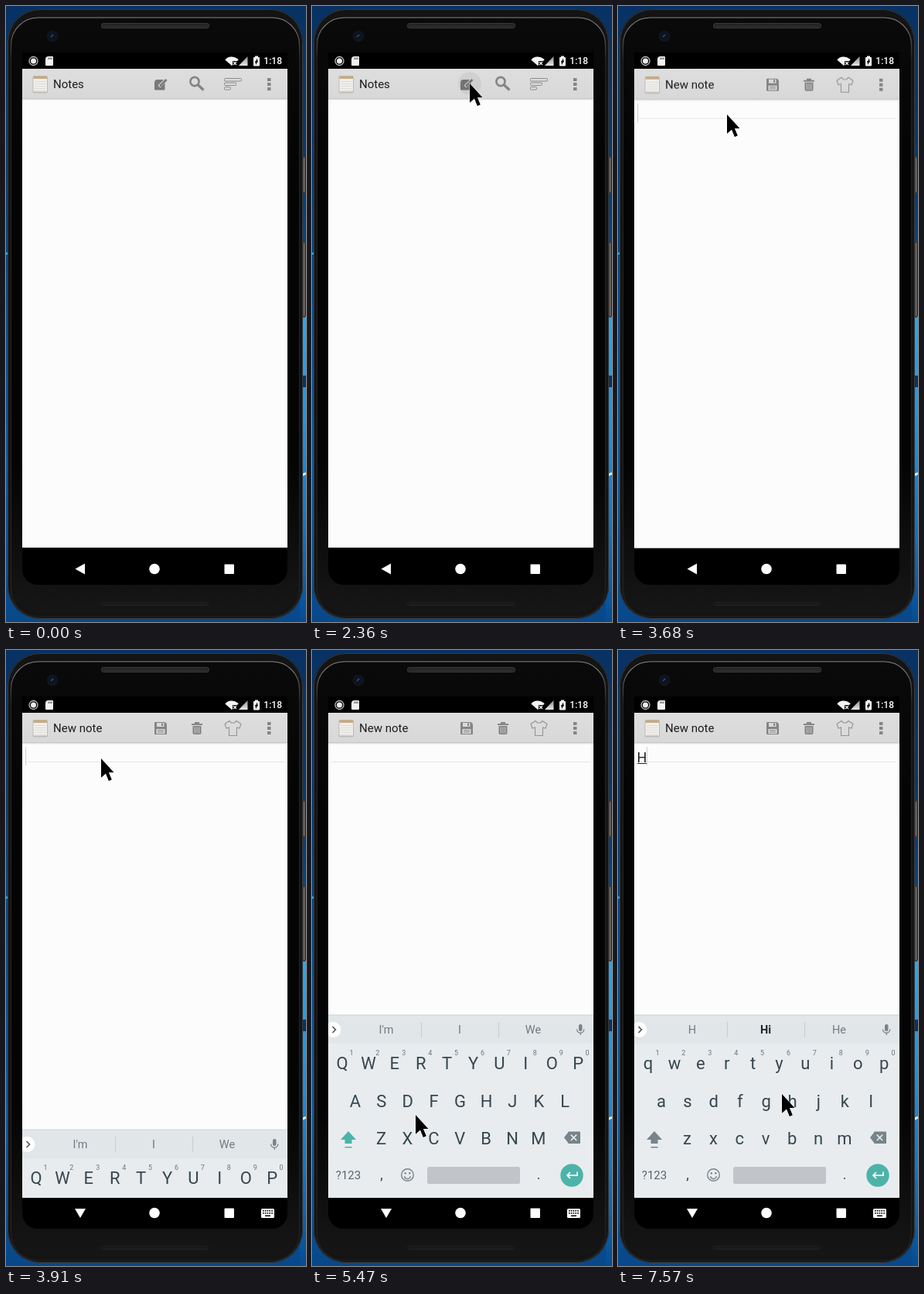
An HTML page with a canvas that plays this animation: 388 px wide and 795 px high, repeating every 8000 ms.

```html
<!DOCTYPE html>
<html lang="en">
<head>
<meta charset="utf-8">
<title>Notes on a phone</title>
<style>
html, body { margin: 0; width: 100%; height: 100%; overflow: hidden; background: #000; }
canvas { display: block; width: 388px; height: 795px; }
</style>
</head>
<body>
<canvas id="stage" width="388" height="795"></canvas>
<script>
const W = 388, H = 795, LOOP = 8000;
const stage = document.getElementById('stage').getContext('2d');
const layerCanvas = document.createElement('canvas');
layerCanvas.width = W;
layerCanvas.height = H;
const layer = layerCanvas.getContext('2d');
let g = stage;

// ---------- helpers ----------
function rect(x, y, w, h, color) {
  g.fillStyle = color;
  g.fillRect(x, y, w, h);
}
function fill(color) {
  g.fillStyle = color;
  g.fill();
}
function stroke(color, width = 1) {
  g.strokeStyle = color;
  g.lineWidth = width;
  g.stroke();
}
function box(x, y, w, h, r) {
  g.beginPath();
  g.roundRect(x, y, w, h, r);
}
function arc(x, y, r, from = 0, to = Math.PI * 2) {
  g.beginPath();
  g.arc(x, y, r, from, to);
}
function trace(points, closed = true) {
  g.beginPath();
  points.forEach(([x, y]) => g.lineTo(x, y));
  if (closed) g.closePath();
}
function roundRect(x, y, w, h, r, color) {
  box(x, y, w, h, r);
  fill(color);
}
function strokeRound(x, y, w, h, r, color, width) {
  box(x, y, w, h, r);
  stroke(color, width);
}
function disc(x, y, r, color) {
  arc(x, y, r);
  fill(color);
}
function ring(x, y, r, color, width) {
  arc(x, y, r);
  stroke(color, width);
}
function segment(x0, y0, x1, y1, color, width) {
  trace([[x0, y0], [x1, y1]], false);
  stroke(color, width);
}
// Isosceles triangle: tip at x,y, pointing along angle.
function triangle(x, y, length, half, angle, color) {
  g.save();
  g.translate(x, y);
  g.rotate(angle);
  trace([[0, 0], [-length, half], [-length, -half]]);
  fill(color);
  g.restore();
}
function chevron(x, y, size, color, width) {
  trace([[x - size, y - Math.abs(size)], [x, y], [x - size, y + Math.abs(size)]], false);
  stroke(color, width);
}
function cross(x, y, r, color, width) {
  segment(x - r, y - r, x + r, y + r, color, width);
  segment(x + r, y - r, x - r, y + r, color, width);
}
function repeat(count, draw) {
  for (let i = 0; i < count; i++) draw(i);
}
function text(str, x, y, size, color, align = 'left', weight = 400) {
  g.font = `${weight} ${size}px Roboto, sans-serif`;
  g.textAlign = align;
  g.fillStyle = color;
  g.fillText(str, x, y);
}
function gradient(y0, y1, ...colors) {
  const grad = g.createLinearGradient(0, y0, 0, y1);
  colors.forEach((color, i) => grad.addColorStop(i / (colors.length - 1), color));
  return grad;
}

// ---------- phone ----------
function wallpaper() {
  rect(0, 0, W, H, gradient(0, H, '#083263', '#083a70', '#0a4d8e', '#0a5ca6', '#08488a'));
  rect(0, 318, 4, 3, '#2fa0dc');
  rect(380, 400, 8, H - 400, gradient(400, H, '#2ba6ee', '#1c95ea', '#0d7ad0', '#084c90'));
  rect(380, 477, 8, 15, '#06335f');
  segment(382, 606, 388, 603, '#d8effc', 3);
}

function speaker(x, y, w, h, color, mesh) {
  strokeRound(x, y, w, h, h / 2, color, 1);
  for (let i = 3; i < w - 2; i += 2) rect(x + i, y + h / 2, 1, 1, mesh);
}

function body() {
  for (const [y, h] of [[194, 48], [304, 98]]) {
    roundRect(381, y, 6.5, h, 1.5, '#3c3a38');
    rect(385, y + 2, 1, h - 4, '#8a8580');
  }
  roundRect(2, 4, 382, 787, 42, '#141414');
  strokeRound(2.5, 4.5, 381, 786, 42, '#3b3b3b', 1);
  roundRect(6, 14, 374, 768, 35, gradient(14, 782, '#0a0a0a', '#040404', '#040404', '#040404', '#161616'));
  strokeRound(6.5, 15, 373, 773, 35, gradient(14, 70, '#8a8a8a', '#222'), 1.2);
  roundRect(123, 22, 140, 7, 3.5, '#232323');
  speaker(123.5, 22.5, 139, 6, '#3a3a3a', '#4a4a4a');
  speaker(123.5, 769.5, 138, 4, '#222', '#333');
  disc(60, 39, 7.5, '#11141a');
  disc(60, 39, 4, '#0a1524');
  segment(58, 40, 61, 37, '#35536f', 1.5);
  roundRect(21, 60, 343, 687, [0, 0, 20, 20], '#000');
}

function statusBar() {
  ring(35.5, 71, 5.5, '#c4c4c4', 1.3);
  disc(35.5, 71, 3.5, '#ededed');
  roundRect(51, 65, 10, 12, [4, 1, 1, 1], '#f2f2f2');
  repeat(3, i => rect(54.5 + i * 2, 66.5, 1, 2.5, '#444'));
  g.beginPath();
  g.moveTo(292, 77);
  g.arc(292, 77, 11.5, -2.42, -0.72);
  fill('#f4f4f4');
  rect(293, 71, 7, 7, '#000');
  cross(296, 74, 2, '#f4f4f4', 1.3);
  trace([[301, 77], [312.5, 77], [312.5, 65]]);
  fill(gradient(65, 77, '#8d8d8d', '#e8e8e8'));
  roundRect(320, 66, 8, 11.5, 1, '#f4f4f4');
  rect(322, 64.5, 4, 2, '#f4f4f4');
  triangle(323.5, 76, 5, 1.5, Math.PI / 2, '#000');
  triangle(324.5, 67.5, 5, 1.5, -Math.PI / 2, '#000');
  text('1:18', 357, 75.3, 12, '#fff', 'right', 500);
}

function navBar(keyboardUp) {
  if (keyboardUp) triangle(96, 733, 12, 7, Math.PI / 2, '#fff');
  else triangle(89.5, 726.5, 12.5, 7, Math.PI, '#fff');
  disc(192, 726.5, 6.8, '#fff');
  roundRect(282.5, 720.5, 12.5, 12.5, 1, '#fff');
  if (!keyboardUp) return;
  roundRect(330, 721, 17, 12, 1.5, '#fff');
  repeat(10, i => rect(332 + i % 5 * 2.8, i < 5 ? 723 : 726, 1.6, 1.6, '#000'));
  rect(335, 729.5, 7, 1.5, '#000');
}

// ---------- app screens ----------
const ICON = '#858585', BAR = '#dadada';

function appWindow(title) {
  rect(21, 81, 343, 618, '#fcfcfc');
  rect(21, 81, 343, 39, gradient(81, 120, '#dedede', '#d8d8d8'));
  rect(21, 119.5, 343, 1, '#b9b9b9');
  rect(21, 120.5, 343, 1, '#ececec');

  roundRect(34.5, 90, 19.5, 22.5, 2.5, '#bdbbb8');
  roundRect(35.5, 92, 17.5, 18.5, 1, '#f1efec');
  rect(35.5, 90.5, 17.5, 3.5, '#c5ab86');
  repeat(5, i => rect(37, 97 + i * 3, 14.5, 1, '#dedbd7'));
  text(title, 61, 106, 15, '#1c1c1c');
  repeat(3, i => rect(338, 93 + i * 6, 4.5, 4, ICON));
}

function pencilIcon() {
  roundRect(192, 95, 13.5, 13.5, [4, 0, 1, 1], '#797979');
  segment(198, 104, 208, 94, BAR, 4);
  segment(199, 103.5, 207.5, 95, '#797979', 2.6);
}

function listScreen(t) {
  appWindow('Notes');
  pencilIcon();
  ring(244, 97.5, 5.6, ICON, 2.6);
  segment(248, 101.5, 255.5, 108.5, ICON, 3.4);
  repeat(3, i => strokeRound(282.5, 93.5 + i * 5.5, 22 - i * 7, 3.5, 1, '#8b8b8b', 1));
  if (t >= 2360 && t < 2440) disc(204, 100, 15, 'rgba(0,0,0,.05)');
  if (t < 3050) return;
  text('<Untitled>', 25, 154, 18, '#111');
  text('2019.05.19 13:18:36', 25, 186, 11.8, '#444');
}

function saveIcon() {
  roundRect(192, 93, 16, 16, [1, 4, 1, 1], ICON);
  rect(195, 94, 9.5, 5, BAR);
  rect(201, 94.5, 2, 3.5, ICON);
  rect(194.5, 102, 11, 6, BAR);
  repeat(2, i => rect(196, 103.3 + i * 2.2, 8, 1, ICON));
}

function trashIcon() {
  rect(240, 95, 14, 2, ICON);
  rect(244, 93, 6, 2, ICON);
  roundRect(241.5, 98, 11, 11, [0, 0, 2, 2], ICON);
  repeat(3, i => rect(243.8 + i * 2.7, 99.5, 1, 8, '#d0d0d0'));
}

function shirtIcon() {
  const half = [[2, 94], [4.5, 91.5], [10.5, 95.5], [8.5, 101], [5, 100], [5, 110.5]];
  const right = half.map(([x, y]) => [293.5 + x, y]);
  const left = half.map(([x, y]) => [293.5 - x, y]).reverse();
  trace([...right, ...left]);
  stroke('#949494', 1.1);
}

// The caret blinks on a steady beat and lights up again after typing.
function caretOn(t) {
  return t >= TYPED || Math.abs(Math.floor((t - 4060) / 507)) % 2 === 1;
}

function noteScreen(t) {
  appWindow('New note');
  saveIcon();
  trashIcon();
  shirtIcon();
  rect(25, 144, 335, 1, t >= KEYS ? '#e3e3fa' : '#e8e8e8');
  const typed = t >= TYPED;
  if (typed) {
    text('H', 24.5, 144.5, 18, '#222');
    rect(25, 146, 12.5, 1, '#222');
  }
  if (caretOn(t)) rect(typed ? 37 : 25, 125, 1, 24, '#d0d0d0');
}

// ---------- keyboard ----------
const KEY = '#37464e', SOFT = '#78838a', TEAL = '#4db3a9', PITCH = 33.9;

function keyRow(letters, x, y, size = 22, color = KEY) {
  [...letters].forEach((c, i) => text(c, x + i * PITCH, y, size, color, 'center'));
}

function suggestions(words, best) {
  rect(21, 471, 343, 37, '#e1e6e9');
  rect(21, 470.5, 343, 1, '#d0d4d7');
  disc(27.5, 490, 10, '#fff');
  chevron(30.5, 490, 4, '#4b5358', 1.6);
  words.forEach((word, i) => {
    const bold = word === best;
    text(word, 96 + i * 95, 495, 14.5, bold ? '#1e272c' : '#727b80', 'center', bold ? 700 : 400);
  });
  repeat(2, i => rect(141 + i * 100, 480, 1, 20, '#c8cdd0'));
  roundRect(345, 483, 4.5, 9, 2.2, SOFT);
  arc(347.2, 489.5, 4.6, 0, Math.PI);
  stroke(SOFT, 1.3);
  rect(346.6, 494, 1.3, 3, SOFT);
}

function keyboard(lower) {
  const cased = s => lower ? s.toLowerCase() : s;
  rect(21, 471, 343, 236, '#e8ecef');
  suggestions(lower ? ['H', 'Hi', 'He'] : ["I'm", 'I', 'We'], 'Hi');
  keyRow(cased('QWERTYUIOP'), 39, 541);
  keyRow('1234567890', 51, 523, 9, '#6b757b');
  keyRow(cased('ASDFGHJKL'), 56, 589.5);
  keyRow(cased('ZXCVBNM'), 89.5, 637.5);

  const shift = lower ? SOFT : TEAL;
  triangle(47, 621, 11, 10, -Math.PI / 2, shift);
  rect(42.5, 631, 9, 6, shift);
  rect(42.5, 641, 9, 1.5, shift);
  triangle(326, 629.3, 6, 7.7, Math.PI, SOFT);
  roundRect(331.5, 621.5, 15.5, 15.5, [0, 1, 1, 0], SOFT);
  cross(338.5, 629.3, 3.7, '#e8ecef', 1.6);

  text('?123', 47, 683, 15, '#59656c', 'center');
  text(',', 90, 683, 18, KEY, 'center');
  text('.', 293, 683, 18, KEY, 'center');
  ring(123.5, 677.5, 7.8, SOFT, 1.4);
  repeat(2, i => disc(120.7 + i * 5.6, 675.2, 1.2, SOFT));
  arc(123.5, 678.5, 4, 0.15, Math.PI - 0.15);
  stroke(SOFT, 1.4);
  roundRect(149, 667, 120, 22, 2.5, '#c1c5c9');
  disc(336, 678, 14.7, TEAL);
  rect(342.2, 673.5, 1.7, 5.3, '#fff');
  segment(330, 678, 343.5, 678, '#fff', 1.7);
  chevron(330, 678, -4, '#fff', 1.7);
}

// ---------- pointer ----------
// Each move runs along a curve in even time steps; power sets how strongly it slows down.
const moves = [
  { from: 570, to: 1120, steps: 7, power: 2, path: [[313, 757], [240, 330], [174, 116]] },
  { from: 1580, to: 1810, steps: 3, power: 1, path: [[180, 115], [193, 108], [204, 103]] },
  { from: 2060, to: 2130, steps: 1, power: 1, path: [[204, 101], [204, 101], [204, 100]] },
  { from: 3370, to: 4060, steps: 9, power: 2.3, path: [[200, 102], [160, 146], [121, 140]] },
  { from: 5080, to: 5620, steps: 7, power: 4, path: [[128, 190], [200, 430], [133, 602]] },
  { from: 5790, to: 6550, steps: 10, power: 1.5, path: [[136, 593], [262, 570], [212, 573]] }
];
const arrow = [[0, 0], [0, 16.5], [4, 13], [6.6, 19.3], [9.2, 18.2], [6.6, 12], [11, 12]];

function pointerAt(t) {
  const move = moves.findLast(({ from }) => t >= from);
  if (!move) return null;
  const { from, to, steps, power, path } = move;
  const step = Math.min(steps, Math.floor((t - from + 6) / (to - from) * steps));
  const s = 1 - (1 - step / steps) ** power;
  return [0, 1].map(axis => {
    const [a, b, c] = path.map(point => point[axis]);
    return Math.round(a * (1 - s) ** 2 + 2 * b * s * (1 - s) + c * s * s);
  });
}

function pointer(t) {
  const spot = pointerAt(t);
  if (!spot) return;
  trace(arrow.map(([x, y]) => [spot[0] + x * 1.5, spot[1] + y * 1.5]));
  stroke('rgba(255,255,255,.6)', 1.4);
  fill(t >= 4060 && t < 4530 ? '#06200f' : '#000');
}

// ---------- timeline ----------
const OPEN = 3220, OPENED = 3760, KEYS = 3910, TYPED = 7500;

function clipped(y, h, draw) {
  g.save();
  g.beginPath();
  g.rect(21, y, 343, h);
  g.clip();
  draw();
  g.restore();
}

function openingNote(t) {
  const age = t - OPEN;
  g = layer;
  g.clearRect(0, 0, W, H);
  noteScreen(t);
  g = stage;
  clipped(81, 626, () => {
    g.globalAlpha = Math.min(1, 0.28 + age / 210);
    g.drawImage(layerCanvas, 0, 41 * Math.exp(-age / 112));
  });
}

function slidingKeyboard(t) {
  const left = Math.max(0, 1 - (t - KEYS) / 150);
  clipped(470, 237, () => {
    g.translate(0, 150 * left ** 2);
    keyboard(t >= TYPED + 70);
  });
}

function draw(t) {
  wallpaper();
  body();
  statusBar();
  if (t < OPENED) listScreen(t);
  else noteScreen(t);
  if (t >= OPEN && t < OPENED) openingNote(t);
  if (t >= KEYS) slidingKeyboard(t);
  navBar(t >= KEYS);
  pointer(t);
}

const start = performance.now();
function tick() {
  draw((performance.now() - start) % LOOP);
  requestAnimationFrame(tick);
}
tick();
</script>
</body>
</html>
```
